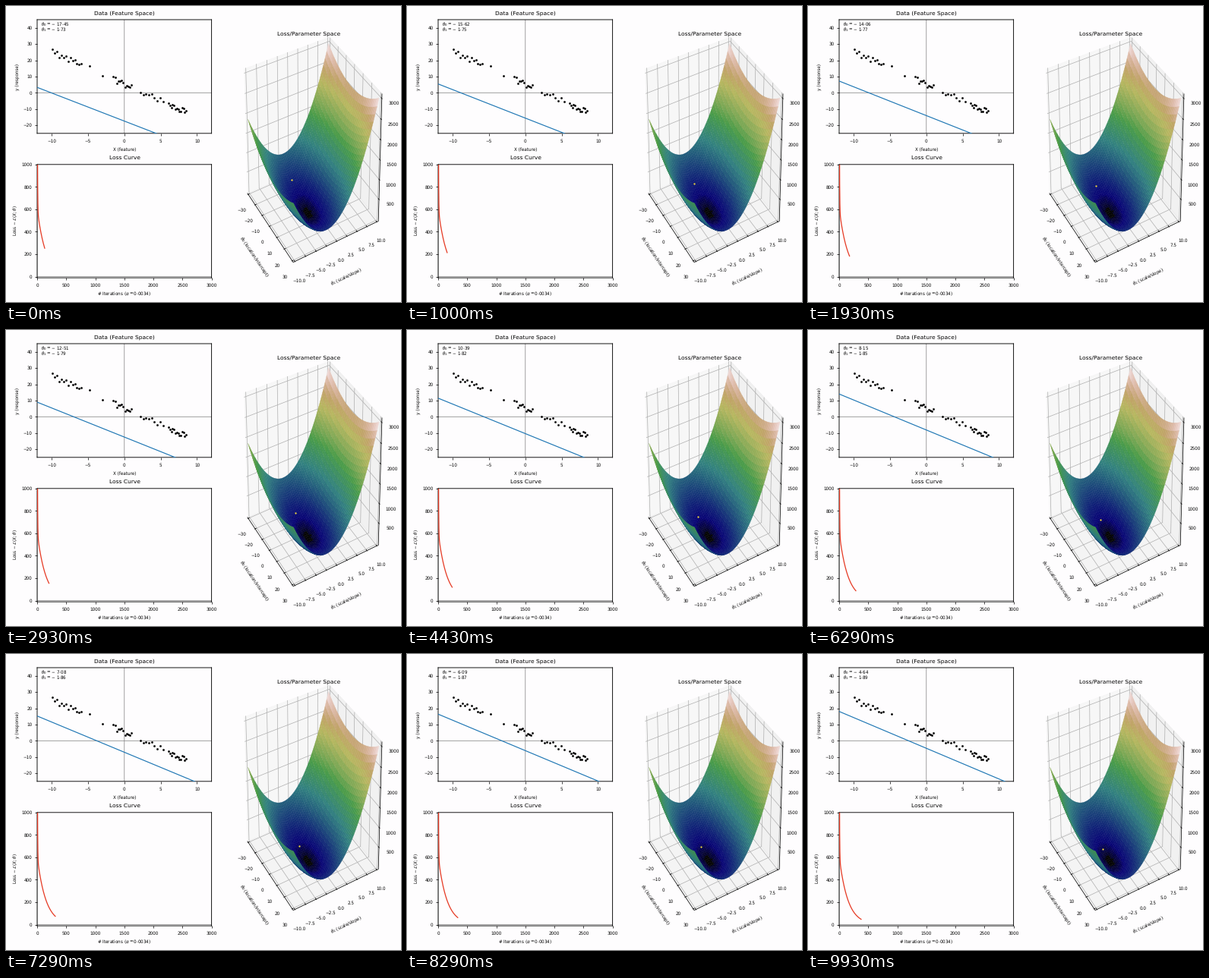
A matplotlib script that plays this animation: 520 by 390 pixels, repeating every 10000 ms.

```python
import numpy as np
import matplotlib.pyplot as plt
from matplotlib.animation import FuncAnimation
from matplotlib.collections import LineCollection, PolyCollection

W, H, DPI = 520, 390, 65
FRAMES, LOOP_MS = 140, 10000
SMALL, TITLE = 6.3, 8.3
plt.rcParams.update({"text.hinting": "none", "path.snap": False})

# Gradient descent for least squares, reduced to its slow and fast modes
ALPHA = 0.0034
BEST0, BEST1 = 5.0917, -2.012
X_SQ, TILT = 35.4, 0.0125
RATE, GAP, FIRST = 0.0033858, 22.5372, 130


def theta(i):
    gap = GAP * np.exp(RATE * (FIRST - i))
    return BEST0 - gap, BEST1 + TILT * gap


def loss(t0, t1):
    d0, d1 = t0 - BEST0, t1 - BEST1
    return 1 + 0.5 * (d0**2 + 2 * TILT * X_SQ * d0 * d1 + X_SQ * d1**2)


def loss_history(i):
    fast = 0.5 * X_SQ * 12**2 * (1 - ALPHA * X_SQ) ** (2 * i)
    return loss(*theta(i)) + fast


fig = plt.figure(figsize=(W / DPI, H / DPI), dpi=DPI, facecolor="#fefdfe")

# Pixel-space layer for free text and the 3D scene
stage = fig.add_axes([0, 0, 1, 1], zorder=-1)
stage.set(xlim=(0, W), ylim=(H, 0))
stage.axis("off")


def put(x, y, s, size=SMALL, rotation=0):
    stage.text(x, y, s, fontsize=size, ha="center", va="center",
               rotation=rotation, zorder=8)


def panel(top, bottom, xlim, ylim, left=41, right=270.6):
    ax = fig.add_axes([left / W, 1 - bottom / H,
                       (right - left) / W, (bottom - top) / H])
    ax.set(xlim=xlim, ylim=ylim, facecolor="#fefdfe")
    ax.tick_params(labelsize=SMALL)
    ax.tick_params(axis="x", pad=5)
    ax.spines[:].set_linewidth(1)
    ax.axhline(0, color="gray", lw=0.8, zorder=1)
    ax.axvline(0, color="gray", lw=0.8, zorder=1)
    return ax


# Data panel: noisy points around the best line, in a few clusters
data_ax = panel(18, 167.8, (-12, 12), (-25, 45))
data_ax.set_xticks(range(-10, 11, 5))
data_ax.set_yticks(range(-20, 41, 10))
rng = np.random.default_rng(4)
clusters = [(-9.9, -5.9, 14), (-4.8, -3, 2), (-1.5, 1, 12),
            (2.2, 5.3, 9), (6.1, 8.5, 14)]
xs = np.concatenate([np.linspace(*c) for c in clusters])
ys = BEST0 + BEST1 * xs + rng.uniform(-1.9, 1.9, xs.size)
data_ax.plot(xs, ys, "o", color="black", ms=3.1, mew=0, zorder=3)
fit_x = np.array([-12.0, 12.0])
fit_line, = data_ax.plot(fit_x, fit_x, color="C0", lw=1.3, zorder=4)

put(156, 9.3, "Data (Feature Space)", TITLE)
put(156, 189.2, "X (feature)")
put(15.2, 93, "y (response)", rotation=90)

# Loss panel
loss_ax = panel(208.8, 358.1, (0, 3000), (-10, 1000))
loss_ax.set_xticks(range(0, 3001, 500))
loss_ax.set_yticks(range(0, 1001, 200))
loss_line, = loss_ax.plot([], [], color="#e63a24", lw=1.4, zorder=4)

put(156, 200, "Loss Curve", TITLE)
put(156, 379.8, rf"# Iterations ($\alpha = {ALPHA}$)")
put(12.3, 283, r"Loss $-$ $\mathcal{L}(X; \theta)$", rotation=90)

# 3D scene: perspective view of the unit cube, elevation 30, azimuth -30
ELEV, AZIM, DIST = np.radians(30), np.radians(-30), 10
CE, SE, CA, SA = np.cos(ELEV), np.sin(ELEV), np.cos(AZIM), np.sin(AZIM)
RIGHT = np.array([-SA, CA, 0])
UP = np.array([-SE * CA, -SE * SA, CE])
TOWARD = np.array([CE * CA, CE * SA, SE])
E = 0.5 + 1 / 48
Z_MIN, Z_MAX = 1, 3050


def view(p):
    """Pixel positions and depths of points in cube coordinates."""
    p = np.asarray(p, float)
    depth = DIST - p @ TOWARD
    xy = np.stack([402.6 + 1243 * (p @ RIGHT) / depth,
                   183.8 - 1839 * (p @ UP) / depth], axis=-1)
    return xy, depth


def unit_z(z):
    return (z - Z_MIN) / (Z_MAX - Z_MIN) - 0.5


def cube(t0, t1, z):
    return np.stack([t0 / 60, t1 / 20, unit_z(z)], axis=-1)


# Each pane is the cube face on which one coordinate is fixed
SQUARE = E * np.array([(-1, -1), (1, -1), (1, 1), (-1, 1)])
for axis, (side, shade) in enumerate([(-E, "0.95"), (E, "0.90"),
                                      (-E, "0.925")]):
    face = np.insert(SQUARE, axis, side, axis=1)
    stage.add_collection(PolyCollection(
        [view(face)[0]], facecolors=shade, edgecolors=shade, alpha=0.5,
        linewidths=0.8, zorder=1), autolim=False)

LABEL_OUT, TICK_OUT, TICK_IN = 0.087, 0.0085, 0.017
grid, ticks = [], []


def add_tick(text, wall, point, tick_dir, away):
    grid.append(view(wall)[0])
    point, tick_dir = np.array(point), np.array(tick_dir)
    ticks.append(view([point + TICK_OUT * tick_dir,
                       point - TICK_IN * tick_dir])[0])
    x, y = view(point + LABEL_OUT * np.array(away))[0]
    put(x, y + 3.6, text.replace("-", "\u2212"))


for v in range(-30, 31, 10):
    a = v / 60
    add_tick(f"{v}", [(a, -E, -E), (a, E, -E), (a, E, E)],
             (a, -E, -E), (0, -1, 0), (0, -1, -1))
for v in np.arange(-10, 10.1, 2.5):
    a = v / 20
    add_tick(f"{v:.1f}", [(E, a, -E), (-E, a, -E), (-E, a, E)],
             (E, a, -E), (1, 0, 0), (1, 0, -1))
for v in range(500, 3001, 500):
    a = unit_z(v)
    add_tick(f"{v}", [(-E, -E, a), (-E, E, a), (E, E, a)],
             (E, E, a), (1, 0, 0), (1, 1, 0))

frame_edges = view([(-E, -E, -E), (E, -E, -E), (E, E, -E), (E, E, E)])[0]
for lines, color, order in ((grid, "#b0b0b0", 2),
                            ([frame_edges] + ticks, "black", 3)):
    stage.add_collection(LineCollection(lines, colors=color, linewidths=0.8,
                                        zorder=order), autolim=False)

# Loss surface, painted from back to front
g0, g1 = np.meshgrid(np.linspace(-30, 30, 50), np.linspace(-10, 10, 50))
gz = loss(g0, g1)
mesh, mesh_depth = view(cube(g0, g1, gz))


def cell_corners(a):
    return np.stack([a[:-1, :-1], a[:-1, 1:], a[1:, 1:], a[1:, :-1]], axis=2)


quads = cell_corners(mesh).reshape(-1, 4, 2)
height = cell_corners(gz).mean(axis=2).ravel()
order = np.argsort(-cell_corners(mesh_depth).mean(axis=2).ravel())
colors = plt.get_cmap("gist_earth")(unit_z(height[order]) + 0.5)
stage.add_collection(PolyCollection(
    quads[order], facecolors=colors, edgecolors=colors, linewidths=0.4,
    zorder=4), autolim=False)

put(399, 36.7, "Loss/Parameter Space", TITLE)
put(326.5, 330.5, r"$\theta_0$ (location/intercept)", rotation=-56)
put(447.7, 356.8, r"$\theta_1$ (scale/slope)", rotation=26)

dot, = stage.plot([], [], "o", color="#f2d93c", ms=2.5, mew=0, zorder=6)

readout = [data_ax.text(45.5, y, "", fontsize=6.1, va="center",
                        transform=stage.transData, zorder=8)
           for y in (24, 31)]


def update(n):
    i = FIRST + round(n * 25 / 14)
    t0, t1 = theta(i)
    fit_line.set_ydata(t0 + t1 * fit_x)
    steps = np.arange(i + 1)
    loss_line.set_data(steps, loss_history(steps))
    x, y = view(cube(t0, t1, loss(t0, t1)))[0]
    dot.set_data([x], [y])
    for k, value in enumerate((t0, t1)):
        readout[k].set_text(rf"$\theta_{k} = -\,{abs(value):.2f}$")
    return [fit_line, loss_line, dot, *readout]


anim = FuncAnimation(fig, update, frames=FRAMES, interval=LOOP_MS / FRAMES,
                     repeat=True, repeat_delay=0, blit=False)
plt.show()
```
